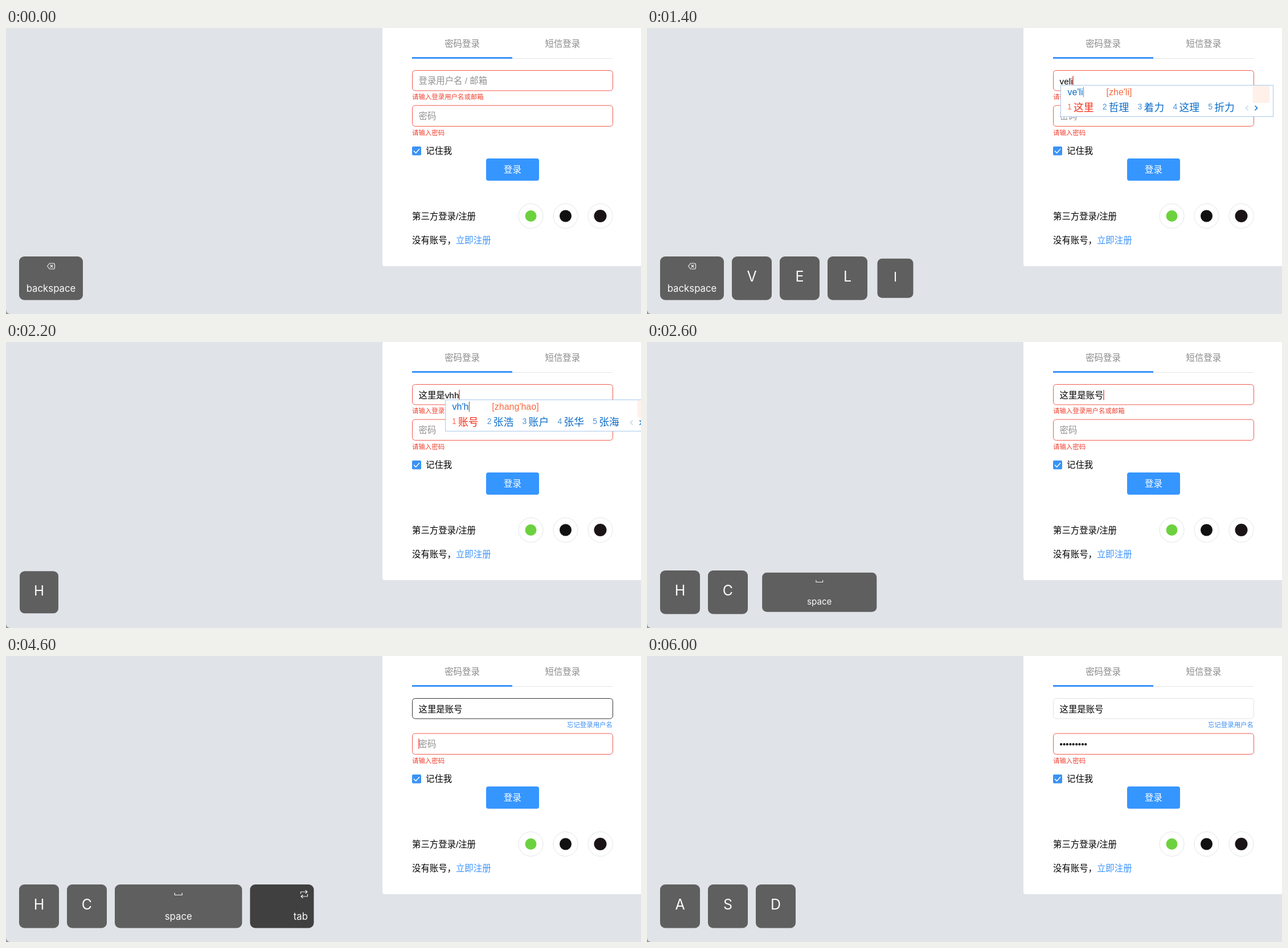
An HTML page for the animation above (6.6 s loop, 1115 by 502 pixels).

```html
<!DOCTYPE html>
<html lang="zh-CN">
<head>
<meta charset="utf-8">
<title>登录</title>
<style>
  html, body { margin: 0; width: 100%; height: 100%; overflow: hidden; background: #e0e3e8; }
  svg { display: block; width: 1115px; height: 502px; }
  text { font-family: "Liberation Sans", "Noto Sans CJK SC", "Noto Sans CJK", sans-serif; font-size: 15.4px; white-space: pre; }
  .small { font-size: 11.45px; }
  .key text { font-family: Inter, sans-serif; font-size: 16.8px; fill: #fafafa; }
  .key .letter { font-size: 25px; }
  .key path { fill: none; stroke: #f2f2f2; stroke-width: 1.2; stroke-linejoin: round; stroke-linecap: round; }
  .shadow { filter: drop-shadow(0 4px 6px rgba(0, 0, 0, .24)); }
</style>
</head>
<body>
<svg viewBox="0 0 1115 502">
  <rect width="1115" height="502" fill="#e0e3e8"/>
  <path d="M0 495Q1 501 7 502H0Z" fill="#909398"/>
  <path d="M661 0H1115V418H665Q661 418 661 414Z" fill="#fff"/>
  <g text-anchor="middle" fill="#8a8a8a">
    <text x="801" y="32.8">密码登录</text>
    <text x="977.3" y="32.8">短信登录</text>
  </g>
  <rect x="889" y="53" width="176" height="1" fill="#e2e4e8"/>
  <rect x="713" y="51" width="176" height="3" fill="#3a93fb"/>

  <rect id="userBox" x="713.5" y="74.5" width="352" height="35.5" rx="5" fill="none"/>
  <rect x="713.5" y="136" width="352" height="36.5" rx="5" fill="none" stroke="#f2594d"/>
  <text id="user" x="724.5" y="98.6"></text>
  <text id="pass" x="724.5" y="159.8"></text>
  <text id="userError" class="small" x="713" y="125.4" fill="#f2402f">请输入登录用户名或邮箱</text>
  <text id="forgot" class="small" x="1065" y="125.4" fill="#3a8ff5" text-anchor="end">忘记登录用户名</text>
  <text class="small" x="713" y="187.6" fill="#f2402f">请输入密码</text>
  <rect id="caret" width="1.4" height="18" fill="#f4433a"/>

  <rect x="713" y="208" width="16" height="15.5" rx="2" fill="#3a93f5"/>
  <path d="M716 215.8L719.6 219.4L726 212.2" fill="none" stroke="#fff" stroke-width="1.5"/>
  <text x="737" y="221.4">记住我</text>
  <rect x="843" y="229" width="93" height="39" rx="4" fill="#3696ff"/>
  <text x="889.5" y="254.2" fill="#fff" text-anchor="middle">登录</text>

  <text x="713" y="335.8">第三方登录/注册</text>
  <g fill="#fff" stroke="#e4e5e7">
    <circle cx="921.5" cy="330" r="21.5"/>
    <circle cx="982.5" cy="330" r="21.5"/>
    <circle cx="1043.5" cy="330" r="21.5"/>
  </g>
  <circle cx="921.5" cy="330" r="10" fill="#6dd13f"/>
  <circle cx="982.5" cy="330" r="10.5" fill="#111"/>
  <circle cx="1043.5" cy="330" r="11" fill="#1b1417"/>
  <text x="713" y="378.4">没有账号，<tspan fill="#3a93fb">立即注册</tspan></text>

  <g id="menu">
    <rect class="shadow" x="726.5" y="113" width="324.5" height="91" rx="8" fill="#fff"/>
    <rect x="727" y="165.5" width="324" height="1" fill="#dcdcdc"/>
    <g fill="none" stroke="#555" stroke-width="1.1">
      <circle cx="745.8" cy="181.6" r="2.9"/>
      <path d="M743.6 183.8L738.6 188.8H740.8V187.2H742.4"/>
    </g>
    <text x="761" y="188.2" fill="#555" style="font-size:10.4px">在 Merrovale 电子钱包中管理密码</text>
  </g>
  <g id="ime"></g>
  <g id="keys"></g>
</svg>
<script>
const LOOP = 6600;
const $ = id => document.getElementById(id);
const RED = '#f2594d';

// Candidate lists of the input method: pinyin, then five choices
const lists = {
  zhong: ['[zhong]', '中 这 值 真 张'],
  zheli: ["[zhe'li]", '这里 哲理 着力 这理 折力'],
  zhelishi: ["[zhe'li'shi]", '这里是 这里 这 着 者'],
  zhanghao: ["[zhang'hao]", '账号 张浩 账户 张华 张海']
};

// Each step changes part of the state; a key may carry *scale and @opacity
const steps = [
  [0, { keys: 'backspace', user: '', typing: '', list: '', pass: 0, caret: '', menu: 0, border: RED, ok: false }],
  [200, { caret: 'user', menu: .5 }],
  [400, { menu: 1 }],
  [800, { caret: '' }],
  [1000, { keys: 'backspace V*.85', typing: 'v', list: 'zhong', caret: 'user', menu: .8 }],
  [1200, { keys: 'backspace V E*.9', typing: "ve'l", list: 'zheli', menu: 0 }],
  [1400, { keys: 'backspace V E L I*.9', typing: "ve'li" }],
  [1600, { keys: 'V@.5 E@.5 L I U*.9', typing: "ve'li'ui", list: 'zhelishi' }],
  [1800, { keys: 'space*.9', user: '这里是', typing: '', list: '' }],
  [2000, { keys: 'space V*.9', typing: 'v', list: 'zhong' }],
  [2200, { keys: 'H*.97', typing: "vh'h", list: 'zhanghao' }],
  [2400, { keys: 'H C*.9', typing: "vh'hc" }],
  [2600, { keys: 'H C space*.9', user: '这里是账号', typing: '', list: '' }],
  [2800, { keys: 'H C space' }],
  [3000, { caret: '' }],
  [3400, { keys: 'H C space tab*.85' }],
  [3600, { keys: 'H C space tab', caret: 'pass', border: '#8a3a35', ok: true }],
  [3800, { border: '#333' }],
  [4000, { caret: '' }],
  [4600, { caret: 'pass' }],
  [5000, { keys: 'H C space tab A S*.85', pass: 2 }],
  [5200, { keys: 'H C space tab A*1.01 S*1.01 D', pass: 5 }],
  [5400, { keys: 'H C space tab A*.97 S D', pass: 7, border: '#888' }],
  [5600, { keys: 'H@.5 C@.5 space@.5 tab@.5 A S D*.97', pass: 9, border: '#dfe1e4' }],
  [5800, { keys: 'A S D' }],
  [6000, { caret: '' }]
];

let last = {};
const states = steps.map(([at, change]) => ({ at, ...(last = { ...last, ...change }) }));

const label = (x, y, s, attrs = '') => `<text x="${x}" y="${y}" ${attrs}>${s}</text>`;

const faces = {
  backspace: w => `<path d="M76.5 413H83Q85.5 413 85.5 415.5V420.5Q85.5 423 83 423H76.5L72.5 418ZM78 416L82 420M82 416L78 420" transform="translate(${w / 2 - 56})"/>`
    .replace('translate(', 'translate(-23 0) translate(') + label(w / 2, 463, 'backspace', 'text-anchor="middle"'),
  space: w => `<path d="M${w / 2 - 6.5} 416V419.5H${w / 2 + 6.5}V416"/>` + label(w / 2, 463, 'space', 'text-anchor="middle"'),
  tab: w => `<path d="M89 417V414H100M97.5 411.5L100.5 414L97.5 416.5M101 418V422H90M92.500 419.500L89.500 422L92.500 424.500"/>` +
    label(w - 10.5, 463, 'tab', 'text-anchor="end"')
};
const widths = { backspace: 112, space: 223.5, tab: 112 };

function drawKeys(row) {
  let x = 23;
  return row.split(' ').map(item => {
    const [, name, scale = 1, alpha = 1] = item.match(/^(\w+)(?:\*([\d.]+))?(?:@([\d.]+))?$/);
    const w = widths[name] || 70;
    const face = faces[name] ? faces[name](w) : label(w / 2, 445.2, name, 'class="letter" text-anchor="middle"');
    const fill = name === 'tab' ? '#404040' : '#5f5f5f';
    const move = `translate(${x + w / 2} 439.2) scale(${scale}) translate(${-w / 2} -439.2)`;
    x += w + 14;
    return `<g class="key" opacity="${alpha}" transform="${move}"><rect y="401" width="${w}" height="76.5" rx="9" fill="${fill}"/>${face}</g>`;
  }).join('');
}

function drawIme(s) {
  if (!s.list) return '';
  const [pinyin, choices] = lists[s.list];
  const x = s.user ? 771.5 : 726.5, y = s.user ? 101.5 : 100.5;
  let cx = x + 12, row = '';
  choices.split(' ').forEach((word, i) => {
    const ink = i ? '#0a6cc8' : '#f5301c';
    row += label(cx - .5, y + 42.5, i + 1, `fill="${i ? '#4c93d6' : '#f5705c'}" style="font-size:14px"`) +
      label(cx + 10.5, y + 45, word, `fill="${ink}" style="font-size:17.8px"`);
    cx += 26.2 + 17.8 * word.length;
  });
  const w = Math.max(330, cx - x + 52), right = x + w;
  const typedWidth = measure(s.typing, 16);
  const arrow = (ax, dir, ink) =>
    `<path d="M${ax - 2 * dir} ${y + 36}l${4 * dir} 4l${-4 * dir} 4" fill="none" stroke="${ink}" stroke-width="1.5"/>`;
  return `<rect x="${x}" y="${y}" width="${w}" height="55" fill="#fff" stroke="#a8c8ea"/>` +
    `<rect x="${right - 36}" y="${y + 1}" width="30" height="30" fill="#fff0e9"/>` +
    label(x + 12, y + 17.5, s.typing, 'fill="#0a6cc8" style="font-size:16px"') +
    `<rect x="${x + 12.5 + typedWidth}" y="${y + 3}" width="1" height="18" fill="${s.user ? '#555' : '#f5602f'}"/>` +
    label(x + 53 + typedWidth, y + 17.5, pinyin, 'fill="#f76b42" style="font-size:16px"') +
    row + arrow(right - 46, -1, '#c3d5e8') + arrow(right - 30, 1, '#0a6cc8');
}

const pen = document.createElement('canvas').getContext('2d');
function measure(s, size) {
  pen.font = `${size}px "Liberation Sans", "Noto Sans CJK SC", "Noto Sans CJK", sans-serif`;
  return pen.measureText(s).width;
}

function field(id, value, hint) {
  $(id).textContent = value || hint;
  $(id).setAttribute('fill', value ? '#000' : '#929292');
}

function render(s) {
  const user = s.user + s.typing.replace(/'/g, '');
  const pass = '•'.repeat(s.pass);
  field('user', user, '登录用户名 / 邮箱');
  field('pass', pass, '密码');
  $('user').setAttribute('y', user ? 98.6 : 97.8);
  $('userBox').setAttribute('stroke', s.border);
  $('userError').setAttribute('opacity', s.ok ? 0 : 1);
  $('forgot').setAttribute('opacity', s.ok ? 1 : 0);
  $('menu').setAttribute('opacity', s.menu);
  const inPass = s.caret === 'pass';
  $('caret').setAttribute('opacity', s.caret ? 1 : 0);
  $('caret').setAttribute('x', 724.3 + measure(inPass ? pass : user, 15.4));
  $('caret').setAttribute('y', inPass ? 145 : 84);
  $('ime').innerHTML = drawIme(s);
  $('keys').innerHTML = drawKeys(s.keys);
}

let shown = null;
function tick(now) {
  const t = Math.max(0, now) % LOOP;
  const s = states.findLast(state => state.at <= t);
  if (s !== shown) render(shown = s);
  requestAnimationFrame(tick);
}
render(shown = states[0]);
requestAnimationFrame(tick);
</script>
</body>
</html>
```
